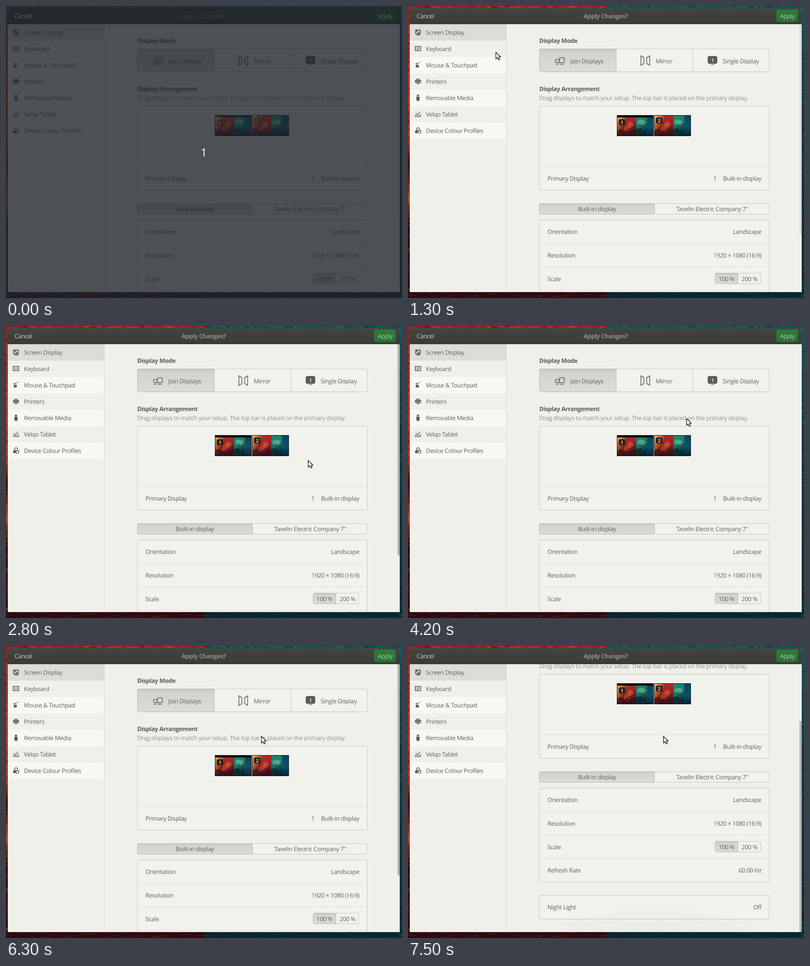
Write an HTML page that moves like this. It is 872x642 px and loops after 8 s.

```html
<!DOCTYPE html>
<html lang="en">
<head>
<meta charset="utf-8">
<title>Display settings</title>
<style>
html, body { margin: 0; width: 100%; height: 100%; overflow: hidden; background: #1a1013; }
svg { display: block; width: 872px; height: 642px; }
text {
  font: 500 13.2px "Open Sans", "Noto Sans", sans-serif;
  letter-spacing: -.37px; fill: #62615c; text-rendering: geometricPrecision; white-space: pre;
}
.b { font-weight: 700; fill: #5a5954; letter-spacing: -.35px; }
.m { text-anchor: middle; }
.e { text-anchor: end; }
.hint { fill: #92928a; }
.badge { font-size: 10.5px; font-weight: 600; fill: #fff; text-anchor: middle; }
.box { fill: #f2f2ed; stroke: #c3c2bb; }
.line { stroke: #dcdbd5; fill: none; }
.div { stroke: #c3c2bb; }
.on { fill: url(#pressed); stroke: #b3b2aa; }
.ico { fill: none; stroke: #5c5b56; stroke-width: 1.5; }
.solid { fill: #5c5b56; stroke: none; }
</style>
</head>
<body>
<svg viewBox="0 0 872 642">
  <defs>
    <linearGradient id="leaf" x2="0" y2="1">
      <stop stop-color="#8f2b1e"/><stop offset=".3" stop-color="#b5371f"/><stop offset=".47" stop-color="#9c2f1c"/>
      <stop offset=".54" stop-color="#3a0d13"/><stop offset=".66" stop-color="#a2481f"/>
      <stop offset=".74" stop-color="#250a10"/><stop offset="1" stop-color="#2c0b10"/>
    </linearGradient>
    <linearGradient id="sea" x2="0" y2="1">
      <stop stop-color="#125a60"/><stop offset=".4" stop-color="#0d3446"/><stop offset="1" stop-color="#0a252d"/>
    </linearGradient>
    <linearGradient id="head" x2="0" y2="1"><stop stop-color="#454540"/><stop offset="1" stop-color="#3b3a36"/></linearGradient>
    <linearGradient id="go" x2="0" y2="1"><stop stop-color="#2f7d3c"/><stop offset="1" stop-color="#2b7036"/></linearGradient>
    <linearGradient id="pressed" x2="0" y2="1">
      <stop stop-color="#c6c5c0"/><stop offset=".15" stop-color="#d3d2cd"/><stop offset="1" stop-color="#dddcd7"/>
    </linearGradient>
    <linearGradient id="gold" x2=".8" y2="1">
      <stop stop-color="#f5c545"/><stop offset=".3" stop-color="#d8702a"/><stop offset=".6" stop-color="#8a2a1e"/><stop offset="1" stop-color="#35101a"/>
    </linearGradient>
    <linearGradient id="red" x2=".3" y2="1">
      <stop stop-color="#b82a28"/><stop offset=".5" stop-color="#a02228"/><stop offset="1" stop-color="#35101a"/>
    </linearGradient>
    <linearGradient id="green" x2=".3" y2="1">
      <stop stop-color="#1f8a70"/><stop offset=".5" stop-color="#1f7569"/><stop offset="1" stop-color="#07262e"/>
    </linearGradient>
    <linearGradient id="blue" x2="0" y2="1">
      <stop stop-color="#0e4f6c"/><stop offset=".55" stop-color="#116680"/><stop offset="1" stop-color="#062232"/>
    </linearGradient>
    <radialGradient id="glowFill">
      <stop stop-opacity=".07"/><stop offset=".85" stop-opacity=".035"/><stop offset="1" stop-opacity="0"/>
    </radialGradient>
    <clipPath id="view"><path d="M217 40H867V629H217z"/></clipPath>
    <g id="thumb">
      <path d="M0 0H81V46H0z"/>
      <path fill="url(#gold)" d="M1 1H23V45H1z"/>
      <path fill="url(#red)" d="M22 1H42V45H22z"/>
      <path fill="url(#green)" d="M42 1H67V45H42z"/>
      <path fill="url(#blue)" d="M66 1H80V45H66z"/>
      <path fill="#c4492a" d="M15 36Q15 26 22 18T36 15Q28 22 27 30z" opacity=".7"/>
      <path fill="#3a1119" d="M1 34Q9 27 14 34T30 35L42 30V45H1z" opacity=".7"/>
      <path fill="#d98a34" d="M25 22Q31 14 38 20Q34 27 28 28z" opacity=".4"/>
      <path fill="#62b98a" d="M45 13Q54 5 64 15L58 22Q50 17 45 21z" opacity=".7"/>
      <path fill="#082c35" d="M42 32Q52 24 57 34T66 30V45H42z" opacity=".85"/>
      <path stroke="#082c40" stroke-width="1.4" d="M69 3V45M73 1V40M77 3V45"/>
    </g>
  </defs>

  <g id="wall">
    <path fill="url(#leaf)" d="M0 0H437V642H0z"/>
    <path fill="url(#sea)" d="M437 0H872V642H437z"/>
  </g>
  <path fill="#f0f0eb" d="M4 30H867V629H4z"/>
  <g id="side"></g>
  <path d="M216.500 40V629" stroke="#d3d2cc"/>

  <g clip-path="url(#view)">
    <g id="page"></g>
    <ellipse id="glow" cx="541" cy="629" rx="228" ry="55" fill="url(#glowFill)"/>
    <rect id="bar" x="862" width="5" height="464" rx="1" fill="#b7b6b1"/>
  </g>

  <path fill="url(#head)" d="M4 40V10Q4 4 10 4H861Q867 4 867 10V40z"/>
  <path d="M4 39.500H867" stroke="#373632"/>
  <path d="M65.500 5V39" stroke="#4a4943"/>
  <rect x="810.500" y="7.500" width="48" height="28" rx="4" fill="url(#go)" stroke="#245a2c"/>
  <text x="19" y="26.500" style="fill:#d3d1ca">Cancel</text>
  <text x="435.500" y="26.500" class="b m" style="fill:#918f87">Apply Changes?</text>
  <text x="835" y="26.500" class="m" style="fill:#a9cbaa">Apply</text>

  <g id="dim">
    <path fill="#1f232b" opacity=".78" d="M0 0H872V642H0z"/>
    <path fill="#202b2b" opacity=".4" d="M4 4H867V40H4z"/>
    <g opacity=".12"><use href="#thumb" x="460" y="240"/><use href="#thumb" x="542" y="240"/></g>
    <g style="opacity:.35">
      <text x="19" y="26.500" style="fill:#a5a8a5">Cancel</text>
      <text x="835" y="26.500" class="m" style="fill:#7fa083">Apply</text>
    </g>
    <text x="435.500" y="330.500" class="m" style="font-size:25px;fill:#fff">1</text>
  </g>
  <g id="cursor" fill="#fff" stroke="#111" stroke-width="1.300" stroke-linejoin="round">
    <path id="arrow" d="M.5.500V15.500L4 12.300L6.300 17.500L9 16.300L6.700 11.200H11.200z"/>
    <path id="hand" d="M-1.500 8V1Q0-1.500 1.500 1V5Q3 4 4 5.500Q6 4.500 6.800 6Q9 5.500 9 7.500V11L7.500 15H-1.500L-5 10Q-4.500 7.500-1.500 10z"/>
  </g>
</svg>
<script>
const $ = id => document.getElementById(id);
const add = (id, s) => $(id).insertAdjacentHTML('beforeend', s);
const text = (x, y, s, c = '') => `<text x="${x}" y="${y}" class="${c}">${s}</text>`;
const path = (d, c, more = '') => `<path d="${d}" class="${c}" ${more}/>`;
const rect = (x, y, w, h, c, r = 3.5) => `<rect x="${x}" y="${y}" width="${w}" height="${h}" rx="${r}" class="${c}"/>`;

// Wallpaper: seeded brush strokes along the visible rim
let seed = 7;
const rnd = () => (seed = seed * 16807 % 2147483647) / 2147483647;
const warm = ['#c94c28', '#1c0a10', '#7e1a1c', '#c87830', '#982820', '#2b0b11'];
const cool = ['#126c73', '#081f2a', '#0f4a5a', '#0a2c38', '#1b7f84', '#0b3944'];
const stroke = (x, y, dx, dy, set, o) => path(`M${x} ${y}q${dx / 2} ${dy} ${dx} ${dy / 2}`, '',
  `fill="none" stroke="${set[rnd() * set.length | 0]}" stroke-width="${1 + rnd()}" opacity="${o}"`);
let rim = '';
for (let y = 0; y < 642; y += 5) {
  rim += stroke(-1, y, 6, rnd() * 10 - 3, warm, .45) + stroke(866, y, 7, rnd() * 12 - 4, cool, .5);
}
for (let x = 0; x < 872; x += 8) {
  const set = x < 437 ? warm : cool;
  rim += stroke(x, rnd() * 4, 14, 2, set, .7) + stroke(x, 629 + rnd() * 14, 18, rnd() * 8 - 4, set, .2);
}
add('wall', rim);

// Sidebar
const icons = [
  path('M17 52.800H27V61.200H17zM17.500 53.500L26 61M19 63.600H26', 'ico', 'style="stroke-width:2"'),
  path('M15.700 88.700H28.300V98.300H15.700z', 'ico') + path('M17.500 91.500H27M17.500 94H27M19 96.500H25', 'ico', 'stroke-dasharray="1.5 1"'),
  path('M17 129.500H24V132Q24 135.500 20.500 135.500T17 132zM17 128.500V127Q17 125 20 125V128.500z', 'solid') + path('M21.500 128V125.500Q24 127 25 124.500T28 123.500', 'ico', 'style="stroke-width:1"'),
  path('M18 160H26V162H18zM15.500 163H28.500V169H26V167H18V169H15.500zM19 168H25V171.500H19z', 'solid'),
  path('M18.500 199H25.500V205Q25.500 209 22 209T18.500 205zM19.500 195H24.500V198H19.500z', 'solid'),
  path('M17.500 237L15.800 243.200H28.200L26.500 237M18.500 241H25M20 240L27 232.500M18 235L21 239', 'ico', 'style="stroke-width:1.2"'),
  '<circle cx="22" cy="271" r="3.300" class="ico"/><circle cx="18.700" cy="276.500" r="3.300" class="solid"/><circle cx="25.300" cy="276.500" r="3.300" class="ico"/>'
];
['Screen Display', 'Keyboard', 'Mouse &amp; Touchpad', 'Printers', 'Removable Media', 'Velqo Tablet', 'Device Colour Profiles']
  .forEach((name, i) => {
    const y = 40 + 36 * i, fill = i ? (i % 2 ? '#f0f0eb' : '#f7f7f4') : '#dddcd8';
    add('side', `<path fill="${fill}" d="M4 ${y}H216V${y + 36}H4z"/>` + icons[i] + text(39.5, y + 22.5, name));
  });

// Scrolling page
const row = (y, name, value) => text(307, y, name) + text(778, y, value, 'e');
add('page',
  text(289, 80.5, 'Display Mode', 'b') +
  rect(289.5, 94.5, 506, 50, 'box') + rect(289.5, 94.5, 169, 50, 'on') + path('M627.500 95V144', 'div') +
  rect(324.800, 117.500, 8.500, 7, 'ico', 2) + rect(333.500, 113.800, 10.700, 11, 'ico', 2) +
  path('M326 128H332M335 128.200H343', 'ico') + text(357.5, 125.5, 'Join Displays') +
  path('M512.800 109.500L519.500 113.500V126.500L512.800 130.500zM532.200 109.500L525.500 113.500V126.500L532.200 130.500z', 'ico') +
  text(545.5, 125.5, 'Mirror') +
  rect(660, 110, 21, 17, 'solid', 4) + path('M665 129.500Q670.500 126.500 676 129.500z', 'solid') +
  text(670.5, 123, '1', 'badge') + text(693, 125.5, 'Single Display') +

  text(289, 186.5, 'Display Arrangement', 'b') +
  text(289, 206.5, 'Drag displays to match your setup. The top bar is placed on the primary display.', 'hint') +
  rect(289.5, 220.5, 506, 184, 'box', 2.5) + path('M290 352.500H795', 'line') +
  '<use href="#thumb" x="460" y="240"/><use href="#thumb" x="542" y="240"/><path d="M460 240H541V245H460z"/>' +
  '<g fill="#2b211d">' + rect(464, 249, 14, 13.5, '', 3) + rect(546, 245, 14, 13.5, '', 3) + '</g>' +
  text(471, 259.5, '1', 'badge') + text(553, 255.5, '2', 'badge') +
  row(383.5, 'Primary Display', 'Built-in display') + text(672.5, 383.5, '1') +

  rect(289.5, 434.5, 506, 23, 'box') + rect(289.5, 434.5, 253, 23, 'on') +
  text(416, 451.300, 'Built-in display', 'm') + text(669.5, 451.300, 'Tavelin Electric Company 7"', 'm') +

  rect(289.5, 470.5, 506, 207, 'box', 2.5) + path('M290 521.500H795M290 573.500H795M290 625.500H795', 'line') +
  row(500.5, 'Orientation', 'Landscape') + row(552.5, 'Resolution', '1920 × 1080 (16:9)') +
  row(604.5, 'Scale', '') + row(656, 'Refresh Rate', '60.00 Hz') +
  rect(676.5, 587.5, 100, 23, 'box') + rect(676.5, 587.5, 50, 23, 'on') +
  text(701.5, 604.5, '100 %', 'm') + text(752, 604.5, '200 %', 'm') +
  rect(289.5, 706.5, 506, 52, 'box', 2.5) + row(737, 'Night Light', 'Off'));

// Timelines: [ms, values...], linear in between
const pointer = [[1000, 115, 57], [1100, 115, 57], [2000, 468, 253], [2300, 468, 253], [2800, 665, 295], [4000, 665, 295],
  [4200, 613, 203], [4900, 460, 112], [6000, 460, 112], [6100, 558, 117], [6200, 558, 117], [6300, 562, 198]];
const barFade = [[1200, 0], [1500, 1], [4000, 1], [4200, 0], [4300, 0], [4600, 1]];
const scroll = [[6700, 0], [6800, 90], [6900, 158]];
const glow = [[6800, 0], [6900, 1], [7200, 1], [7500, .3]];

function at(keys, t) {
  const i = keys.findIndex(k => k[0] > t);
  if (i < 0) return keys[keys.length - 1].slice(1);
  if (!i) return keys[0].slice(1);
  const a = keys[i - 1], b = keys[i], p = (t - a[0]) / (b[0] - a[0]);
  return a.slice(1).map((v, j) => v + (b[j + 1] - v) * p);
}
const show = (id, on) => $(id).style.display = on ? '' : 'none';

function draw(now) {
  const t = Math.floor(now % 8000 / 100) * 100;
  const [x, y] = at(pointer, t).map(Math.round), [top] = at(scroll, t);
  const onThumb = x >= 460 && x < 623 && y >= 240 && y < 286;
  show('dim', t < 100);
  show('cursor', t >= 1000);
  show('hand', onThumb);
  show('arrow', !onThumb);
  $('cursor').setAttribute('transform', `translate(${x} ${y})`);
  $('page').setAttribute('transform', `translate(0 ${-top})`);
  $('bar').setAttribute('y', 40 + top / 158 * 125);
  $('bar').setAttribute('opacity', at(barFade, t)[0]);
  $('glow').setAttribute('opacity', at(glow, t)[0]);
  requestAnimationFrame(draw);
}
draw(performance.now());
</script>
</body>
</html>
```
